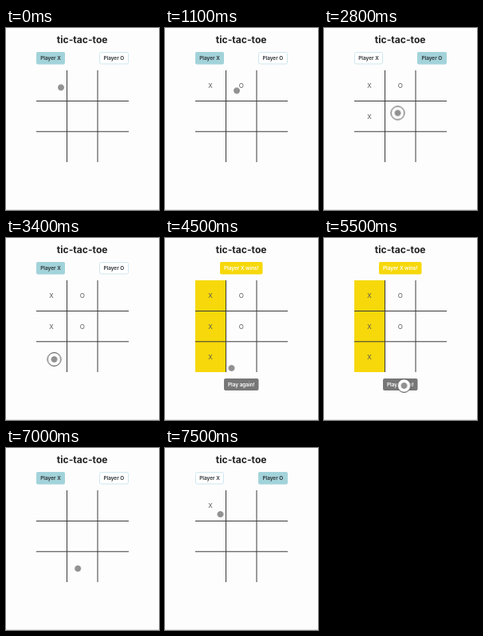
An HTML page that plays this animation: 192 px wide and 228 px high, repeating every 8 s.

```html
<!DOCTYPE html>
<html lang="en">
<head>
<meta charset="utf-8">
<title>tic-tac-toe</title>
<style>
html, body { margin: 0; width: 100%; height: 100%; overflow: hidden; background: #fefdfe; }
svg { display: block; width: 192px; height: 228px; }
text { font: 600 6.4px Inter, "Liberation Sans", sans-serif; fill: #2b2f33; text-anchor: middle; }
.title { font-size: 12.1px; font-weight: 700; fill: #222; }
.mark { font-size: 8px; font-weight: 400; fill: #555; }
.light { fill: #fff; }
.idle { fill: #fff; stroke: #cde7ee; }
.active { fill: #a3d3da; }
.gold { fill: #f6d80b; }
.grid { stroke: #3a3a3a; fill: none; }

/* One loop is 8 s, so 1.25% is 100 ms */
.anim { animation: 8s step-end infinite; }
.turn-x { animation-name: turn-x; }
.turn-o { animation-name: turn-o; }
.playing { animation-name: playing; }
.won { animation-name: won; }
.m1 { animation-name: m1; }
.m2 { animation-name: m2; }
.m3 { animation-name: m3; }
.m4 { animation-name: m4; }
.ring { animation-name: ring; }
.cursor { animation-name: move; }

@keyframes turn-x {
  0%, 13.75%, 36.25% { opacity: 1; }
  5%, 21.25%, 92.5%, 100% { opacity: 0; }
}
@keyframes turn-o {
  0%, 13.75%, 36.25% { opacity: 0; }
  5%, 21.25%, 92.5%, 100% { opacity: 1; }
}
@keyframes playing { 0%, 70%, 100% { opacity: 1; } 43.75% { opacity: 0; } }
@keyframes won { 0%, 70%, 100% { opacity: 0; } 43.75% { opacity: 1; } }
@keyframes m1 { 0%, 70% { opacity: 0; } 5%, 92.5%, 100% { opacity: 1; } }
@keyframes m2 { 0%, 70%, 100% { opacity: 0; } 13.75% { opacity: 1; } }
@keyframes m3 { 0%, 70%, 100% { opacity: 0; } 21.25% { opacity: 1; } }
@keyframes m4 { 0%, 70%, 100% { opacity: 0; } 36.25% { opacity: 1; } }
@keyframes ring {
  0%, 21.25%, 36.25%, 43.75%, 70%, 92.5%, 100% { opacity: 0; }
  20%, 33.75%, 41.25%, 67.5%, 91.25% { opacity: 1; }
}
@keyframes move {
  0% { transform: translate(69px, 74.5px); }
  1.25% { transform: translate(68.5px, 75px); }
  8.75% { transform: translate(68.5px, 75px); animation-timing-function: steps(3, start); }
  12.5% { transform: translate(90px, 78.5px); }
  16.25% { transform: translate(90px, 78.5px); animation-timing-function: steps(3, start); }
  20% { transform: translate(67px, 106px); }
  30% { transform: translate(67px, 106px); animation-timing-function: steps(3, start); }
  33.75% { transform: translate(92.5px, 106.5px); }
  37.5% { transform: translate(92.5px, 106.5px); animation-timing-function: steps(4, start); }
  42.5% { transform: translate(60.5px, 152px); }
  56.25% { transform: translate(83.5px, 163px); }
  57.5% { transform: translate(83.5px, 163px); animation-timing-function: steps(3, start); }
  61.25% { transform: translate(100.5px, 185px); }
  87.5% { transform: translate(100.5px, 185px); animation-timing-function: steps(3, start); }
  91.25%, 100% { transform: translate(69.5px, 83px); }
}
</style>
</head>
<body>
<svg viewBox="0 0 192 228">
  <text class="title" x="95.7" y="19">tic-tac-toe</text>
  <path d="M0 227.5H192" stroke="#e2e2e4"/>

  <g class="anim playing">
    <rect class="idle" x="38.5" y="30.5" width="35" height="14.5" rx="2"/>
    <rect class="active anim turn-x" x="38" y="30" width="36" height="15.5" rx="2"/>
    <text x="56" y="40.2">Player X</text>
    <rect class="idle" x="117.5" y="30.5" width="36" height="14.5" rx="2"/>
    <rect class="active anim turn-o" x="117" y="30" width="37" height="15.5" rx="2"/>
    <text x="135.3" y="40.2">Player O</text>
  </g>

  <g class="anim won">
    <rect class="gold" x="69" y="30" width="53.5" height="15.5" rx="2"/>
    <text class="light" x="95.8" y="40.2">Player X wins!</text>
    <rect class="gold" x="38" y="53" width="38.5" height="115"/>
    <rect x="74" y="176" width="43.5" height="15" rx="2" fill="#777"/>
    <text class="light" x="95.8" y="186">Play again!</text>
  </g>

  <path class="grid" d="M76.5 53V168M115 53V168M38 91.5H154M38 129.8H154"/>

  <text class="mark anim m1" x="57" y="75.2">X</text>
  <text class="mark anim m2" x="95.7" y="75.2">O</text>
  <text class="mark anim m3" x="57" y="113.7">X</text>
  <text class="mark anim m4" x="95.7" y="113.7">O</text>
  <text class="mark anim won" x="57" y="152.2">X</text>

  <g class="anim cursor">
    <circle class="anim ring" r="8.4" fill="#fff" stroke="#444"/>
    <circle r="3.5" fill="#929292" stroke="#808080" stroke-width=".8"/>
  </g>
</svg>
</body>
</html>
```
